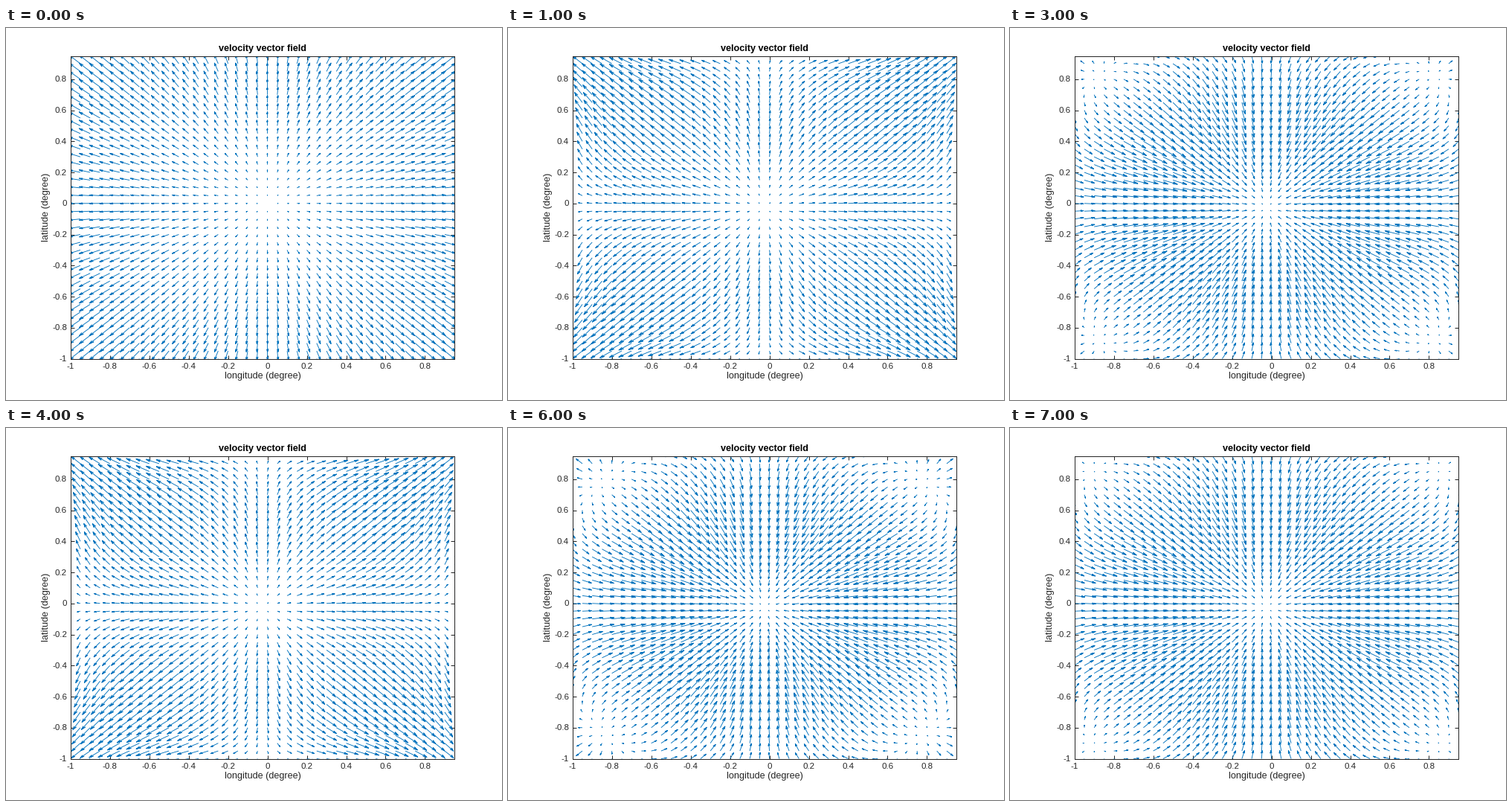
Write a matplotlib script that moves like this. It is 667 px wide and 500 px high and loops after 8000 ms.

```python
import numpy as np
import matplotlib.pyplot as plt
from matplotlib.animation import FuncAnimation
from matplotlib.collections import LineCollection

W, H = 667, 500
DPI = 100
PX = 72 / DPI                      # points per pixel
BLUE, GREY = "#0072bd", "#262626"
LEFT, RIGHT, TOP, BOTTOM = 86.7, 603.2, 37.5, 444.5
LO, HI = -1.0, 0.95
SECONDS = 8
BURSTS = (0.5, 4)                  # times at which the wave turns outward

plt.rcParams["font.family"] = "Liberation Sans"
grid = np.linspace(LO, HI, 40)
gx, gy = np.meshgrid(grid, grid)


def component(along, across, t):
    """Velocity along one axis: a wave off the centre plus an outflow at the corners."""
    if t < BURSTS[0]:
        return np.sin(1.25 * along)
    age = t - max(b for b in BURSTS if b <= t)
    outward = age < 1
    flat = 0 if outward else max(0, 2 - age)
    corner = 0.65 if outward else 0.6 + 1.1 / age
    wave = np.sin((3.05 - 0.2 * age) * along * np.abs(along) ** flat)
    outflow = corner * along * np.abs(np.sin(1.6 * across)) ** 3
    return outflow + (wave if outward else -wave)


def velocity(t):
    # the staggered grid shifts the centre by half a cell once waves run
    centre = 0 if t < BURSTS[0] else -0.025
    x, y = gx - centre, gy - centre
    u, v = component(x, y, t), component(y, x, t)
    longest = 1.2 * np.sqrt(2) * (HI - LO) / len(grid)
    scale = longest / np.hypot(u, v).max()
    return u * scale, v * scale


def arrows(t, head=0.3, spread=0.27):
    u, v = velocity(t)
    tip_x, tip_y = gx + u, gy + v
    side_a = (tip_x - head * (u + spread * v), tip_y - head * (v - spread * u))
    side_b = (tip_x - head * (u - spread * v), tip_y - head * (v + spread * u))
    tip = (tip_x, tip_y)
    points = np.array([(gx, gy), tip, side_a, tip, side_b])
    return points.transpose(2, 3, 0, 1).reshape(-1, 5, 2)


fig = plt.figure(figsize=(W / DPI, H / DPI), dpi=DPI, facecolor="white")
ax = fig.add_axes([LEFT / W, 1 - BOTTOM / H, (RIGHT - LEFT) / W, (BOTTOM - TOP) / H])
ax.set(xlim=(LO, HI), ylim=(LO, HI))
ticks = np.arange(-5, 5) / 5
ax.set_xticks(ticks)
ax.set_yticks(ticks)
ax.tick_params(direction="in", top=True, right=True, length=5 * PX, width=PX,
               color=GREY, labelbottom=False, labelleft=False)
for spine in ax.spines.values():
    spine.set(color=GREY, linewidth=PX)


def label(x, y, text, size=12.65, color=GREY, ha="center", **style):
    fig.text(x / W, 1 - y / H, text, fontsize=size * PX, color=color,
             ha=ha, va="baseline", rotation_mode="anchor", **style)


for tick in ticks:
    part = (tick - LO) / (HI - LO)
    label(LEFT + part * (RIGHT - LEFT), 458.5, f"{tick:g}", 11.5)
    label(82, BOTTOM - part * (BOTTOM - TOP) + 3.5, f"{tick:g}", 11.5, ha="right")
label((LEFT + RIGHT) / 2, 471, "longitude (degree)")
label(57, (TOP + BOTTOM) / 2, "latitude (degree)", rotation=90)
label((LEFT + RIGHT) / 2, 31, "velocity vector field", color="black", weight="bold")

field = LineCollection(arrows(0), colors=BLUE, linewidths=0.9 * PX, joinstyle="round")
ax.add_collection(field, autolim=False)


def draw(second):
    field.set_segments(arrows(second))
    return (field,)


anim = FuncAnimation(fig, draw, frames=SECONDS, interval=1000,
                     repeat=True, repeat_delay=0)
plt.show()
```
